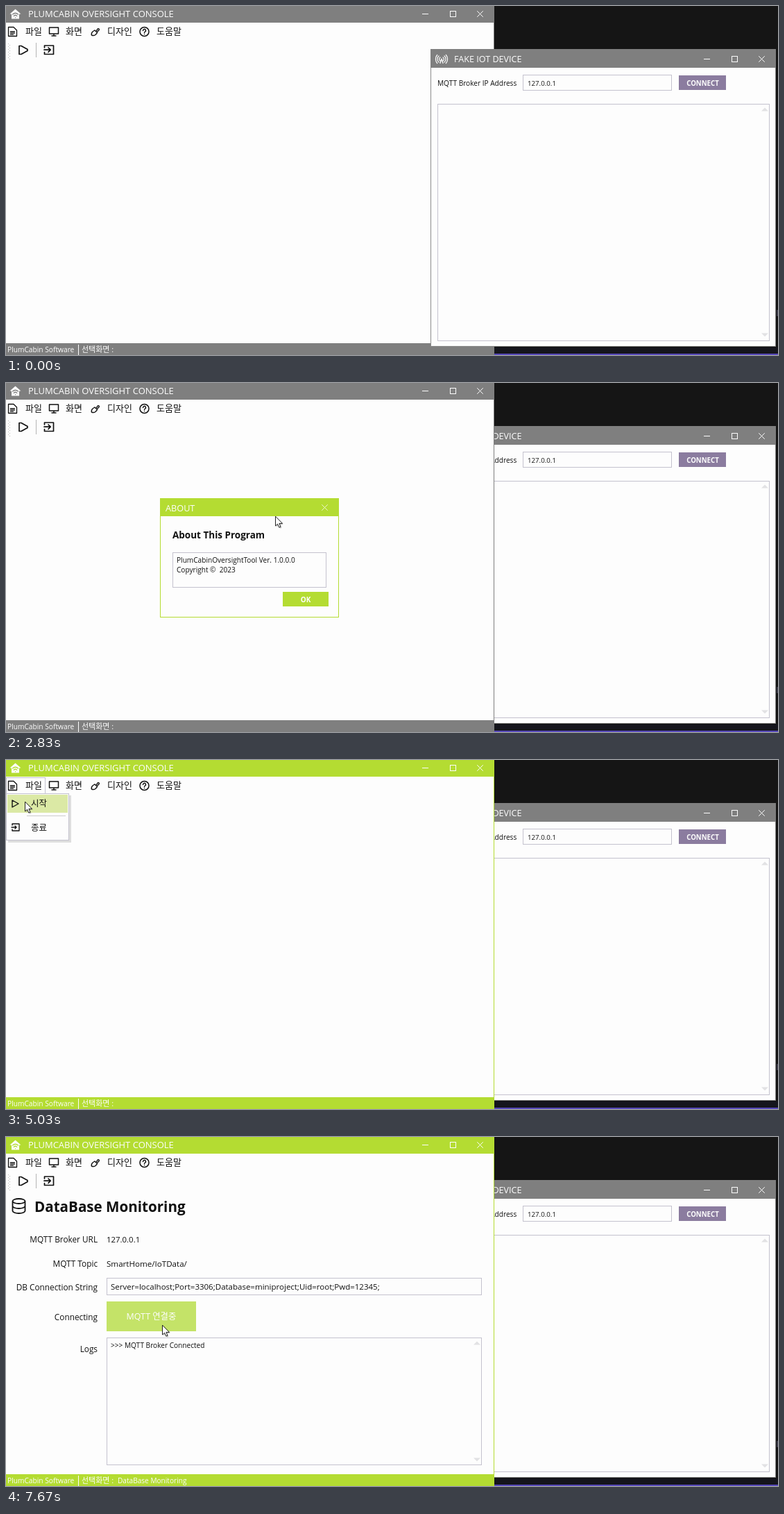
Animation, 1113 px wide and 503 px high, one loop 8 s. Source, as an HTML page with a canvas:

```html
<!DOCTYPE html>
<html lang="ko">
<head>
<meta charset="utf-8">
<title>Monitoring demo</title>
<style>
html, body { margin: 0; width: 100%; height: 100%; overflow: hidden; background: #151515; }
canvas { display: block; }
</style>
</head>
<body>
<canvas id="stage" width="1113" height="503"></canvas>
<script>
const ctx = document.getElementById('stage').getContext('2d');
const LOOP = 8000;
const SANS = '"Open Sans", "Noto Sans CJK KR", "Noto Sans CJK", sans-serif';
const WHITE = '#fdfdfd', GREY = '#7f7f7f', LIME = '#b4dc32', EDGE = '#c4c2ce', INK = '#111';

const clamp = v => Math.max(0, Math.min(1, v));
const smooth = p => p * p * (3 - 2 * p);
const within = (t, a, b) => t >= a && t < b;
const inside = (p, x, y, w, h) => p && p.x >= x && p.x < x + w && p.y >= y && p.y < y + h;

function rect(x, y, w, h, color) {
  ctx.fillStyle = color;
  ctx.fillRect(x, y, w, h);
}
function frame(x, y, w, h, color, width = 1) {
  ctx.strokeStyle = color;
  ctx.lineWidth = width;
  ctx.strokeRect(x + width / 2, y + width / 2, w - width, h - width);
}
function text(str, x, y, size, color = INK, align = 'left', weight = 400) {
  ctx.font = `${weight} ${size}px ${SANS}`;
  ctx.textAlign = align;
  ctx.fillStyle = color;
  ctx.fillText(str, x, y);
}
function stroke(d, x, y, color = INK, width = 1.5) {
  ctx.save();
  ctx.translate(x, y);
  ctx.strokeStyle = color;
  ctx.lineWidth = width;
  ctx.lineJoin = ctx.lineCap = 'round';
  ctx.stroke(new Path2D(d));
  ctx.restore();
}
function fill(d, x, y, color) {
  ctx.save();
  ctx.translate(x, y);
  ctx.fillStyle = color;
  ctx.fill(new Path2D(d));
  ctx.restore();
}

// Pointer stops: time, x, y
const STOPS = [
  [200, 470, 520], [830, 300, 110], [1100, 243, 42], [1600, 243, 42], [1900, 250, 60],
  [2250, 250, 60], [2830, 388, 192], [3230, 430, 313], [3500, 430, 313], [4270, 22, 40],
  [4700, 22, 40], [5030, 27, 60], [5500, 27, 60], [6280, 350, 324], [6550, 350, 324],
  [7230, 225, 271]
];
function pointerAt(t) {
  if (t < STOPS[0][0]) return null;
  for (let i = 1; i < STOPS.length; i++) {
    const [t0, x0, y0] = STOPS[i - 1], [t1, x1, y1] = STOPS[i];
    if (t < t1) {
      const p = smooth((t - t0) / (t1 - t0));
      return { x: x0 + (x1 - x0) * p, y: y0 + (y1 - y0) * p };
    }
  }
  const [, x, y] = STOPS[STOPS.length - 1];
  return { x, y };
}
function drawPointer(p) {
  const d = 'M.5 .5V14L3.6 11.2L5.8 16.2L8 15.2L5.9 10.4H10.2Z';
  fill(d, p.x + 1.5, p.y + 1.5, 'rgba(0,0,0,.22)');
  fill(d, p.x, p.y, '#fff');
  stroke(d, p.x, p.y, '#222', 1);
}

function cross(x, y, color = WHITE) {
  stroke('M-4 -4L4 4M4 -4L-4 4', x, y, color, 1);
}
function windowButtons(x, y) {
  rect(x - 5, y, 9, 1, WHITE);
  frame(x + 35, y - 4, 9, 9, WHITE);
  cross(x + 78.5, y + .5);
}
function scrollArrows(x, top, bottom) {
  fill('M-5 2.5L0 -2.5L5 2.5Z', x, top, '#e2e2e4');
  fill('M-5 -2.5L0 2.5L5 -2.5Z', x, bottom, '#e2e2e4');
}

function drawDesktop() {
  rect(0, 0, 1113, 503, '#151515');
  rect(704, 492, 409, 9, '#15151c');
  rect(704, 501, 409, 2, '#5648b8');
  rect(1111, 438, 2, 9, '#3b3b48');
}

function drawDevice() {
  rect(612, 62, 498, 429, WHITE);
  frame(612, 62, 498, 429, '#8b8b8b');
  rect(612, 62, 498, 27, GREY);
  stroke('M-2 2.5A3 3 0 0 1 -2 -2.5M2 2.5A3 3 0 0 0 2 -2.5M-4 4.5A6 6 0 0 1 -4 -4.5M4 4.5A6 6 0 0 0 4 -4.5' +
    'M-6.3 6A9 9 0 0 1 -6.3 -6M6.3 6A9 9 0 0 0 6.3 -6M0 -.5L-2 6M0 -.5L2 6', 628, 76.5, WHITE, 1.2);
  text('FAKE IOT DEVICE', 646, 81, 12.6, WHITE);
  windowButtons(1011, 76);
  text('MQTT Broker IP Address', 622, 115, 10.1);
  frame(745, 99, 215, 23, EDGE);
  text('127.0.0.1', 752, 115, 9.7);
  rect(970, 100, 68, 21, '#8b7c9f');
  text('CONNECT', 1004.5, 115, 9.7, WHITE, 'center', 700);
  frame(622, 141, 479, 342, EDGE);
  scrollArrows(1094, 149, 474);
}

function menuItem(label, x, hot, left, width) {
  if (hot) frame(left, 25, width, 24, EDGE);
  text(label, x, 41, 13);
}

function drawMenus(t, p) {
  const modal = within(t, 2150, 3480) || within(t, 5310, 6440);
  const hot = (x, w) => !modal && inside(p, x, 25, w, 24);
  menuItem('파일', 28, hot(0, 57) || within(t, 4480, 5290), 0, 57);
  menuItem('화면', 86, hot(59, 57), 59, 57);
  menuItem('디자인', 146, hot(118, 69), 118, 69);
  menuItem('도움말', 217, hot(190, 69) || within(t, 1400, 2150), 190, 69);

  stroke('M0 0H7.5L12 4.5V13H0ZM2.8 6.5H9M2.8 8.6H9M2.8 10.7H7', 3.5, 30.5, INK, 1.3);
  stroke('M0 0H13V9H0ZM6.5 9V12M3.5 12H9.5', 62.5, 31, INK, 1.5);
  stroke('M5 3.5L2.5 5Q-.2 7 .3 10.3Q3 12 6 10L8.5 7ZM5 3.5L8.5 7M7.5 4L9.5 1.2Q11.8 .8 11.2 3L8.8 5.5', 123, 31.5, INK, 1.4);
  stroke('M6.5 0A6.5 6.5 0 1 1 -6.5 0A6.5 6.5 0 1 1 6.5 0M-2 -1.6A2 2 0 1 1 1 .1Q0 .6 0 1.6M0 3.5V3.6', 199.5, 37, INK, 1.5);

  for (let y = 54; y < 75; y += 4) {
    rect(3, y, 1, 1, '#bbb');
    rect(5, y + 2, 1, 1, '#bbb');
  }
  stroke('M0 0V12H3L12 7V5L3 0Z', 19, 57.5, INK, 1.7);
  rect(43, 53, 1, 21, '#b5b5b5');
  stroke('M0 3V0H13V12.5H0V9.5M-.5 6.2H8.5M5.5 3L8.7 6.2L5.5 9.4', 55.5, 57, INK, 1.7);
}

function popup(x, y, w, h) {
  rect(x + 3, y + 3, w, h, 'rgba(0,0,0,.12)');
  rect(x, y, w, h, WHITE);
  frame(x, y, w, h, EDGE);
}
function drawPopups(t) {
  if (within(t, 1400, 2150)) {
    ctx.globalAlpha = clamp((t - 1400) / 80);
    popup(190, 48, 116, 28);
    if (t > 1720) rect(192, 50, 112, 24, '#dbe9a5');
    text('프로그램 정보', 218, 66, 12.5);
  }
  if (within(t, 4470, 5290)) {
    ctx.globalAlpha = clamp((t - 4440) / 90);
    popup(0, 48, 91, 68);
    if (t > 4860) rect(2, 50, 87, 26, '#dbe9a5');
    stroke('M0 0V10L9 5Z', 9, 58, INK, 1.4);
    text('시작', 36, 67, 12.5);
    rect(30, 80, 56, 1, '#ccc');
    stroke('M0 2V0H10V10H0V8M-1 5H6M4 3L6 5L4 7', 9, 92, INK, 1.4);
    text('종료', 36, 102, 12.5);
  }
  ctx.globalAlpha = 1;
}

function drawDatabase(t) {
  stroke('M-9 -7A9 3.5 0 0 1 9 -7A9 3.5 0 0 1 -9 -7V7A9 3.5 0 0 0 9 7V-7M-9 0A9 3.5 0 0 0 9 0', 18.5, 99.5, INK, 1.8);
  text('DataBase Monitoring', 41, 108, 20.6, INK, 'left', 700);
  const labels = [['MQTT Broker URL', 152], ['MQTT Topic', 187], ['DB Connection String', 221], ['Connecting', 264], ['Logs', 310]];
  for (const [label, y] of labels) text(label, 132, y, 11.8, INK, 'right');
  text('127.0.0.1', 145, 152, 11.4);
  text('SmartHome/IoTData/', 145, 187, 11.6);
  frame(145, 203, 541, 25, EDGE);
  text('Server=localhost;Port=3306;Database=miniproject;Uid=root;Pwd=12345;', 151, 220, 11.5);

  const on = t >= 7470;
  rect(145, 237, 129, 43, '#d9d9d9');
  ctx.globalAlpha = clamp((t - 7430) / 120);
  rect(145, 237, 129, 43, '#c4e368');
  ctx.globalAlpha = 1;
  text(on ? 'MQTT 연결중' : 'MQTT 연결', 209.5, 263, 12.4, on ? WHITE : INK, 'center');

  frame(145, 289, 541, 184, EDGE);
  scrollArrows(679, 297, 465);
  if (t >= 7600) text('>>> MQTT Broker Connected', 151, 304, 10.1);
}

function drawMain(t, p) {
  const active = within(t, 1270, 2150) || within(t, 3480, 5310) || t >= 6440;
  const tone = active ? LIME : GREY;
  const loaded = t >= 6560;
  rect(0, 0, 704, 503, WHITE);
  rect(703, 0, 1, 503, tone);
  rect(0, 0, 704, 24, tone);
  rect(0, 486, 704, 17, tone);

  fill('M8 0L16 7H13.5V14H2.5V7H0Z', 5.5, 4.5, WHITE);
  stroke('M-4 -2Q0 -5.5 4 -2M-2.3 .4Q0 -1.8 2.3 .4M0 2.6V2.7', 13.5, 14, tone, 1.3);
  text('PLUMCABIN OVERSIGHT CONSOLE', 32, 16, 13, WHITE);
  windowButtons(605, 11);
  drawMenus(t, p);
  if (loaded) drawDatabase(t);

  text('PlumCabin Software', 2, 499, 10.2, WHITE);
  rect(104, 488, 1, 15, WHITE);
  text('선택화면 :', 109, 499, 11, WHITE);
  if (loaded) text('DataBase Monitoring', 161, 499, 10.1, WHITE);
  drawPopups(t);
}

// Dialog body slides left while it fades in
function dialog(title, y, h, age, body) {
  rect(222, y, 258, h, WHITE);
  frame(222, y, 258, h, LIME);
  rect(222, y, 258, 26, LIME);
  text(title, 230, y + 18.5, 12.7, WHITE);
  cross(459.5, y + 13.5, '#edf6cc');
  const left = Math.pow(1 - clamp(age / 500), 3);
  ctx.save();
  ctx.beginPath();
  ctx.rect(223, y + 26, 256, h - 27);
  ctx.clip();
  ctx.translate(20 * left, 0);
  ctx.globalAlpha = 1 - left;
  body();
  ctx.restore();
}

function aboutBody() {
  text('About This Program', 240, 224, 13.5, INK, 'left', 700);
  frame(240, 244, 222, 51, EDGE);
  text('PlumCabinOversightTool Ver. 1.0.0.0', 246, 259, 10.1);
  text('Copyright ©  2023', 246, 273, 10.1);
  rect(399, 301, 66, 21, LIME);
  text('OK', 432, 316, 10, WHITE, 'center', 700);
}

function field(y, label, value) {
  frame(236, y, 230, 39, EDGE);
  text(label, 240, y + 10, 9.3, '#777');
  text(value, 242, y + 29, 11.3);
}
function settingBody(p) {
  field(216, '브로커 아이피를 입력하세요', '127.0.0.1');
  field(263, 'MQTT 토픽을 입력하세요', 'SmartHome/IoTData/');
  rect(329, 306, 69, 31, inside(p, 329, 306, 69, 31) ? '#000' : LIME);
  frame(329, 306, 69, 31, '#000', 2);
  text('MQTT 접속', 363, 325, 10.3, WHITE, 'center', 700);
  rect(402, 306, 69, 31, '#7b9c0e');
  frame(402, 306, 69, 31, '#000', 2);
  text('취소', 436.5, 325, 10.8, WHITE, 'center', 700);
}

function draw(t) {
  const p = pointerAt(t);
  drawDesktop();
  if (t < 1270) {
    drawMain(t, p);
    drawDevice();
  } else {
    drawDevice();
    drawMain(t, p);
  }
  if (within(t, 2160, 3480)) dialog('ABOUT', 166, 172, t - 2160, aboutBody);
  if (within(t, 5322, 6440)) dialog('MQTT SETTING', 157, 189, t - 5322, () => settingBody(p));
  if (p) drawPointer(p);
}

const start = performance.now();
function tick() {
  draw((performance.now() - start) % LOOP);
  requestAnimationFrame(tick);
}
tick();
</script>
</body>
</html>
```
